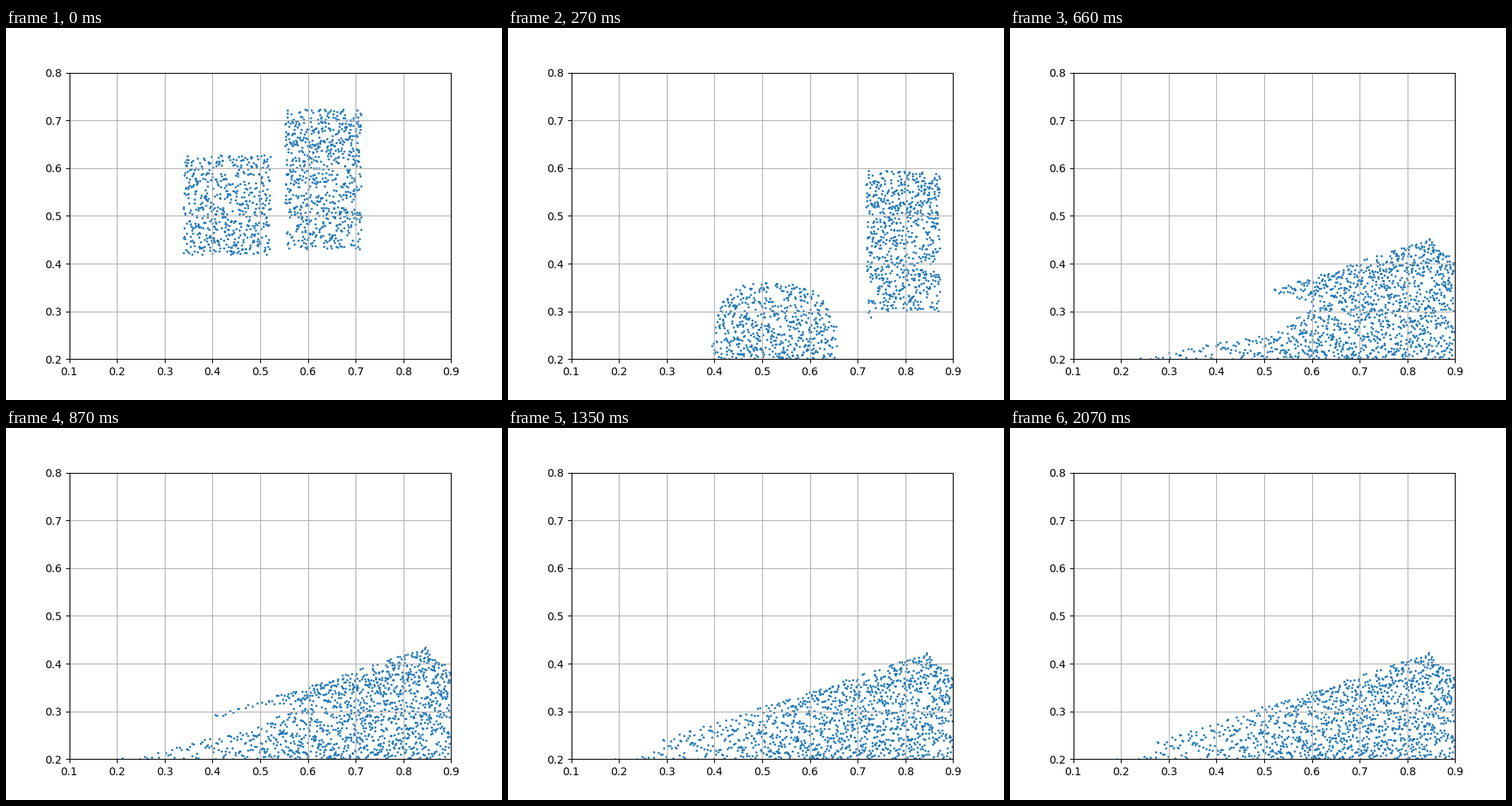
A matplotlib script that plays this animation: 640 by 480 pixels, repeating every 2.1 s.

```python
import numpy as np
import matplotlib.pyplot as plt
from matplotlib.animation import FuncAnimation

FRAMES, INTERVAL = 70, 30
FLOOR = 0.2
rng = np.random.default_rng(7)


def flight(x, y, w, h, vx, vy):
    """Pose of a thrown block, as a function of the frame."""
    def at(f):
        x0, y0 = x + vx * f, y + vy * f
        return x0, x0 + w, lambda q: y0, lambda q: y0 + h
    return at


def floor(x):
    return FLOOR


def dome(x):
    return FLOOR + 0.145 * (1 - ((x - 0.52) / 0.16) ** 4)


def splash(x):
    """Left block bursting outwards, up to the face of the right one."""
    return np.minimum(FLOOR + 0.145 * np.sqrt((x - 0.29) / 0.4), face(x))


def rebound(x):
    return FLOOR + 0.04 * (1 - ((x - 0.5) / 0.08) ** 4)


def face(x):
    return FLOOR + 3 * (0.748 - x)


def crest(x):
    return 0.39 + 0.135 * ((x - 0.685) / 0.2) ** 0.45


def surface(x):
    """Final slope of the heap with its drop at the wall."""
    return np.minimum(0.408 + 0.325 * (x - 0.8), 0.426 - 1.2 * (x - 0.855))


def seam(x):
    """Border between the blocks while the right one slides over."""
    return FLOOR + 0.12 * np.sqrt((0.9 - x) / 0.3)


def spill(x):
    toe = np.maximum(FLOOR + 0.18 * (x - 0.21), FLOOR + 0.75 * (x - 0.45))
    return np.minimum(toe, seam(x))


def bed(x):
    """Border between the blocks at rest."""
    s = np.sin(np.pi * np.clip((x - 0.2) / 0.7, 0, 1))
    return FLOOR + 0.001 + 0.1 * np.abs(s) ** 1.5


def place(pose, u, v, thin):
    """Spread unit-square samples evenly between two curves."""
    x0, x1, low, high = pose
    x = np.linspace(x0, x1, 800)
    lo = np.maximum(low(x), FLOOR) + 0 * x
    hi = np.maximum(high(x), lo)
    mass = hi - lo + 1e-6
    if thin:
        mass *= np.interp(x, [0.4, 0.6], [0.5, 1])
    cdf = np.append(0, np.cumsum((mass[1:] + mass[:-1]) / 2))
    qx = np.interp(u, cdf / cdf[-1], x)
    low, high = np.interp(qx, x, lo), np.interp(qx, x, hi)
    return np.column_stack([qx, low + v * (high - low)])


def tangents(t, p):
    """Monotone slopes, so that grains never overshoot a pose."""
    d = np.diff(p, axis=0) / np.diff(t)[:, None, None]
    a, b = d[:-1], d[1:]
    same = a * b > 0
    mid = np.where(same, 2 * a * b / np.where(same, a + b, 1), 0)
    return np.concatenate([d[:1], mid, d[-1:]])


def track(poses, n):
    """Positions of n grains in every frame: array (frame, grain, xy)."""
    u = (np.arange(n) + rng.random(n)) / n
    v = rng.random(n)
    t = np.array(list(poses), float)
    p = np.array([place(pose, u, v, k > 14) for k, pose in poses.items()])
    m = tangents(t, p)
    out = []
    for f in range(FRAMES):
        i = min(np.searchsorted(t, f, side="right") - 1, len(t) - 2)
        h = t[i + 1] - t[i]
        s = min((f - t[i]) / h, 1)
        out.append((1 + 2 * s) * (1 - s) ** 2 * p[i]
                   + s * (1 - s) ** 2 * h * m[i]
                   + s * s * (3 - 2 * s) * p[i + 1]
                   + s * s * (s - 1) * h * m[i + 1])
    return np.array(out)


throw_left = flight(0.339, 0.419, 0.182, 0.209, 0.0144, -0.0313)
throw_right = flight(0.552, 0.430, 0.159, 0.294, 0.0169, -0.0146)

left = {
    0: throw_left(0),
    7: throw_left(7),
    10: (0.365, 0.675, floor, dome),
    14: (0.292, 0.748, rebound, splash),
    22: (0.212, 0.897, floor, spill),
    38: (0.12, 0.898, floor, bed),
    54: (0.12, 0.898, floor, bed),
}

right = {
    0: throw_right(0),
    10: throw_right(10),
    14: (0.686, 0.895, face, crest),
    22: (0.515, 0.897, seam, lambda x: surface(x) + 0.03),
    38: (0.305, 0.898, bed, surface),
    54: (0.27, 0.898, bed, surface),
}

grains = np.concatenate([track(left, 560), track(right, 720)], axis=1)

fig, ax = plt.subplots(figsize=(6.4, 4.8), dpi=100)
ax.set_aspect("equal")
ax.set_xlim(0.1, 0.9)
ax.set_ylim(0.2, 0.8)
ax.grid(True)
dots = ax.scatter(*grains[0].T, s=1, color="tab:blue")
ax.set_xticks(np.arange(1, 10) / 10)
ax.set_yticks(np.arange(2, 9) / 10)


def draw(i):
    dots.set_offsets(grains[i])
    return (dots,)


anim = FuncAnimation(fig, draw, frames=FRAMES, interval=INTERVAL, repeat=True)
plt.show()
```
